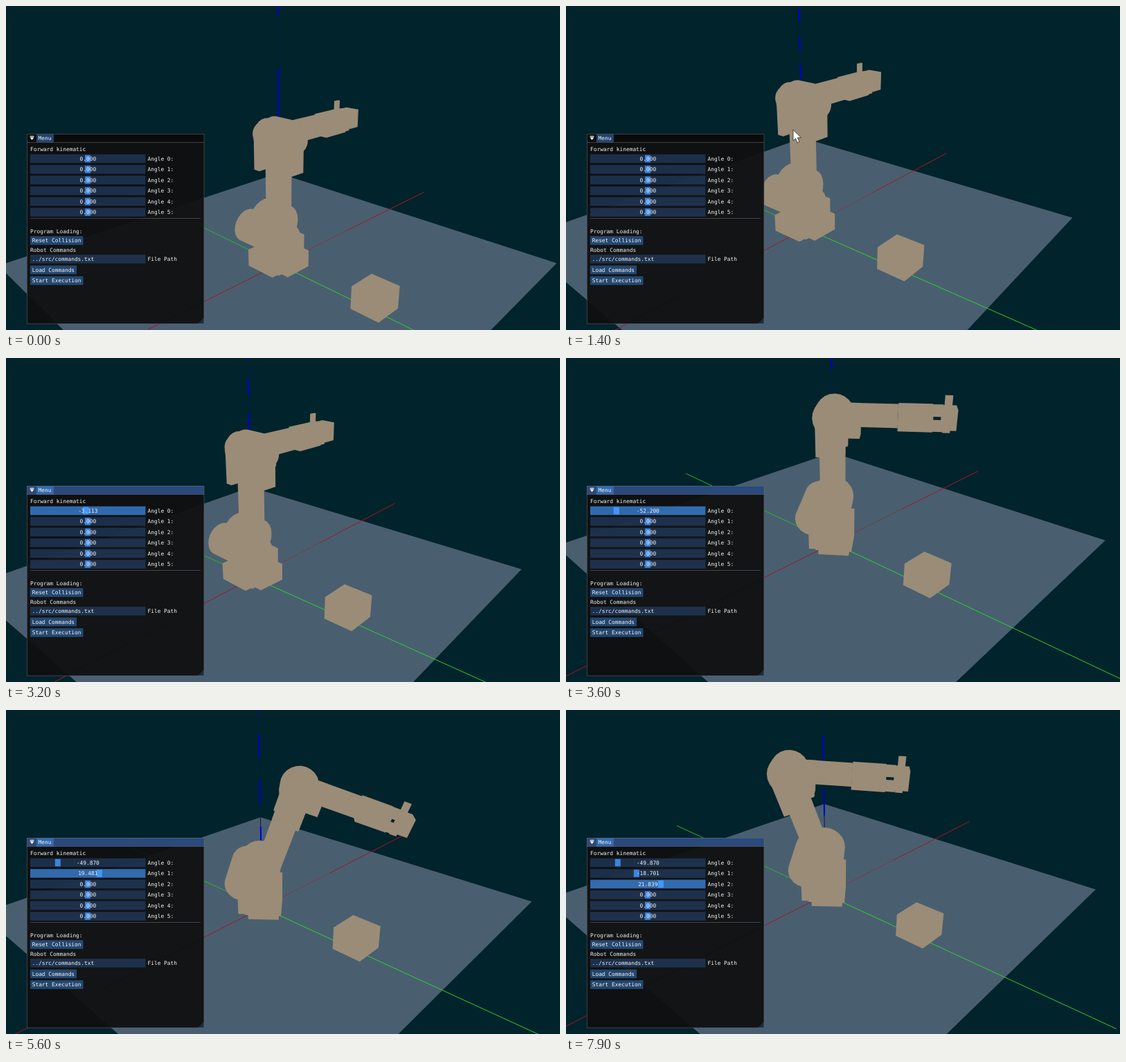
Recreate the animation shown at these times as an HTML page with a canvas. Size 800 by 469 pixels, loop 8 s.

```html
<!DOCTYPE html>
<html lang="en">
<head>
<meta charset="utf-8">
<title>Robot arm viewer</title>
<style>
html, body { margin: 0; width: 100%; height: 100%; overflow: hidden; background: #01232b; }
canvas { display: block; width: 800px; height: 469px; }
</style>
</head>
<body>
<canvas id="stage" width="800" height="469"></canvas>
<script>
const ctx = document.getElementById('stage').getContext('2d');
const W = 800, H = 469, LOOP = 8000, STEP = 100;
const BG = '#01232b', FLOOR = '#495f70', CLAY = '#9b8c77';
const rad = deg => deg * Math.PI / 180;

// Piecewise linear track of [time, ...values]
function sample(keys, t) {
  const i = Math.max(0, keys.findLastIndex(k => k[0] <= t));
  const a = keys[i], b = keys[i + 1] || a;
  const u = a === b ? 0 : (t - a[0]) / (b[0] - a[0]);
  return a.slice(1).map((v, n) => v + (b[n + 1] - v) * u);
}

// Where the world origin appears on the stage while the fixed camera looks around
const aim = [
  [0, 394, 374], [1400, 346, 322], [1800, 346, 322], [2800, 328, 368], [3600, 386, 268],
  [4500, 386, 268], [5600, 370, 286], [6700, 389, 249], [7900, 375, 267]
];

// Joint angles in degrees
const joints = [
  [[0, 0], [2100, 0], [2800, 45.974], [3600, -52.2], [4200, -49.87]],
  [[0, 0], [4800, 0], [5600, 19.481], [6400, -18.701]],
  [[0, 0], [7000, 0], [7900, 21.839]]
];
const drags = [[2000, 4400], [4700, 6500], [6900, 8000]];
const cursors = [
  [[1200, 350, 165], [1400, 328, 179], [1600, 300, 186], [2000, 118, 221]],
  [[4400, 74, 221], [4700, 118, 236]],
  [[6500, 102, 236], [6700, 118, 244], [6900, 118, 252]]
];

// Camera: focal length in pixels, distance from the origin along the diagonal, height
const FOCAL = 750, BACK = 234, HEIGHT = 130;
const SLOPE = HEIGHT / Math.hypot(BACK, HEIGHT);

// Projection that puts the origin on the given pixel
function makeCamera(t) {
  const [px, py] = sample(aim, t), u = px - W / 2, v = py - H / 2;
  const pitch = Math.asin(SLOPE * Math.hypot(FOCAL, u, v) / Math.hypot(FOCAL, v)) - Math.atan2(v, FOCAL);
  const c = Math.cos(pitch), s = Math.sin(pitch);
  const yaw = -Math.atan2(u, FOCAL * c - v * s), cy = Math.cos(yaw), sy = Math.sin(yaw);
  return ([x, y, z]) => {
    const f = BACK + (x + y) * Math.SQRT1_2, r = (x - y) * Math.SQRT1_2, down = HEIGHT - z;
    const ahead = f * cy + r * sy, side = r * cy - f * sy, k = FOCAL / (ahead * c + down * s);
    return [W / 2 + side * k, H / 2 + (down * c - ahead * s) * k];
  };
}

// Solids as corner lists; the arm reaches along x, its joints turn around y
function box(x0, x1, y0, y1, z0, z1) {
  const out = [];
  for (const x of [x0, x1]) for (const y of [y0, y1]) for (const z of [z0, z1]) out.push([x, y, z]);
  return out;
}
function cylinder(axis, a, b, r, from, to) {
  const out = [];
  for (let i = 0; i < 24; i++) {
    const p = a + r * Math.cos(rad(i * 15)), q = b + r * Math.sin(rad(i * 15));
    for (const d of [from, to]) out.push(axis === 'y' ? [p, d, q] : [p, q, d]);
  }
  return out;
}

const AXIS = 142, HALF = 100, SHOULDER = [0, 14], ELBOW = [.7, 66.6];
const cube = box(-5.9, 8.8, -64.5, -49.9, 0, 11.2);
const base = [
  box(-11.5, 9, -7, 10, 0, 9),
  box(-6, 9, -12, 10, 0, 9),
  box(-8, 10, -8, 9, 0, 16),
  cylinder('y', -1, 23, 10.5, -4, 9),
  cylinder('y', -8, 20, 8.5, -14, 14)
];
const arm = [
  cylinder('z', 0, 0, 6.2, 18, 52.5),
  box(-6.5, 6.5, -10, -4, 50, 66),
  box(-6.5, 6.5, 6.5, 10, 50, 66)
];
const fore = [
  cylinder('y', ...ELBOW, 9.2, -5, 5),
  cylinder('y', ...ELBOW, 7.5, -10, 10),
  cylinder('y', ...ELBOW, 4.7, -13.5, 13.5),
  box(5, 13, -4, 4, 57.5, 72),
  box(5, 30, -4, 4, 63, 72),
  box(30, 45.5, -4, 4, 61.5, 72.5),
  // fork, hand and tool
  box(45, 50, -3, 3, 68.4, 72.5),
  box(45, 50, -3, 3, 61.5, 65.3),
  box(49.5, 56, -4, 4, 62.5, 72),
  box(51, 54.5, 4, 8, 64, 70),
  box(51, 54.5, 7.5, 8.5, 58, 75.5),
  box(52, 53, 8, 13, 66, 66.8),
  box(52, 53, 8, 13, 63, 63.8)
];

// Outline of a set of points
function hull(points) {
  const sorted = [...points].sort((a, b) => a[0] - b[0] || a[1] - b[1]);
  const chain = list => {
    const out = [];
    for (const p of list) {
      while (out.length > 1) {
        const a = out[out.length - 2], b = out[out.length - 1];
        if ((b[0] - a[0]) * (p[1] - a[1]) > (b[1] - a[1]) * (p[0] - a[0])) break;
        out.pop();
      }
      out.push(p);
    }
    return out.slice(0, -1);
  };
  return [...chain(sorted), ...chain(sorted.reverse())];
}

function bend([x, y, z], [cx, cz], deg) {
  const c = Math.cos(rad(deg)), s = Math.sin(rad(deg)), dx = x - cx, dz = z - cz;
  return [cx + dx * c + dz * s, y, cz + dz * c - dx * s];
}

function fillPoly(points, color) {
  ctx.beginPath();
  points.forEach(p => ctx.lineTo(p[0], p[1]));
  ctx.closePath();
  ctx.fillStyle = color;
  ctx.fill();
}

function line(a, b, color, width = 1) {
  ctx.beginPath();
  ctx.moveTo(a[0], a[1]);
  ctx.lineTo(b[0], b[1]);
  ctx.strokeStyle = color;
  ctx.lineWidth = width;
  ctx.stroke();
}

function drawScene(project) {
  const ray = (a, b, ...style) => line(project(a), project(b), ...style);
  ctx.fillStyle = BG;
  ctx.fillRect(0, 0, W, H);
  fillPoly([[1, 1], [1, -1], [-1, -1], [-1, 1]].map(([x, y]) => project([x * HALF, y * HALF, 0])), FLOOR);

  const o = [0, 0, 0];
  ray([-AXIS, 0, 0], [AXIS, 0, 0], '#a3142b');
  ray(o, [AXIS * .4, 0, 0], '#5b5660');
  ray([0, AXIS, 0], o, '#27b82e');
  ray(o, [0, -AXIS, 0], '#2bd32b');

  // The upright axis breaks into dashes where it steps across pixel columns
  const foot = project(o), head = project([0, 0, AXIS]);
  const lean = Math.abs((foot[0] - head[0]) / (foot[1] - head[1]));
  const dash = Math.min(75, .65 / Math.max(lean, .001));
  line(head, foot, '#061a4c');
  ctx.setLineDash([dash, dash]);
  line(head, foot, '#0000d8', 2);
  ctx.setLineDash([]);

  fillPoly(hull(cube.map(project)), CLAY);
}

function drawRobot(project, [yaw, lift, fold]) {
  const c = Math.cos(rad(yaw)), s = Math.sin(rad(yaw));
  const spin = ([x, y, z]) => [x * c - y * s, x * s + y * c, z];
  const raise = p => bend(p, SHOULDER, lift);
  const draw = (solids, pose) => solids.forEach(solid =>
    fillPoly(hull(solid.map(p => project(spin(pose(p))))), CLAY));
  draw(base, p => p);
  draw(arm, raise);
  draw(fore, p => raise(bend(p, ELBOW, fold)));
}

function rect(x, y, w, h, color) {
  ctx.fillStyle = color;
  ctx.fillRect(x, y, w, h);
}

function text(str, x, y, align = 'left') {
  ctx.textAlign = align;
  ctx.fillStyle = '#f4f4f4';
  ctx.fillText(str, x, y + .5);
}

function button(label, y, w) {
  rect(35, y - 6.3, w, 12.6, 'rgba(66,150,250,.4)');
  text(label, 37.7, y);
}

function drawMenu(t, angles) {
  const focused = t >= drags[0][0], edge = 'rgba(110,110,128,.5)', field = 'rgba(41,74,122,.54)';
  ctx.font = '7.85px "DejaVu Sans Mono", "Liberation Mono", monospace';
  ctx.textBaseline = 'middle';
  rect(30, 185, 256, 275, 'rgba(15,15,15,.94)');
  rect(30, 185, 256, 12.5, focused ? '#294a7a' : '#0a0a0a');
  rect(44, 185.5, 25, 12, focused ? '#3369ad' : '#24436c');
  ctx.strokeStyle = edge;
  ctx.lineWidth = 1;
  ctx.strokeRect(30.5, 185.5, 255.5, 274.5);
  line([30, 197.5], [286, 197.5], edge);
  rect(34.5, 188, 6, 1.2, '#fff');
  fillPoly([[34.5, 190], [40.5, 190], [37.5, 194]], '#fff');
  text('Menu', 46.5, 191);

  text('Forward kinematic', 35, 207.5);
  for (let i = 0; i < 6; i++) {
    const y = 221 + i * 15.5, v = angles[i] || 0;
    const held = i < 3 && t >= drags[i][0] && t < drags[i][1];
    rect(35, y - 6.3, 166.5, 12.6, held ? 'rgba(66,150,250,.67)' : field);
    rect(114 + v * .866, y - 5.3, 8, 10.6, held ? '#4296fa' : '#3d85e0');
    text(v.toFixed(3), 118.3, y, 'center');
    text('Angle ' + i + ':', 204.5, y);
  }
  line([35, 307.5], [281, 307.5], edge);

  text('Program Loading:', 35, 326);
  button('Reset Collision', 339.5, 76.5);
  text('Robot Commands', 35, 353);
  rect(35, 360, 166.5, 12.6, field);
  text('../src/commands.txt', 37.5, 366.3);
  text('File Path', 204.5, 366.3);
  button('Load Commands', 382, 67);
  button('Start Execution', 397.5, 76.5);
  fillPoly([[286, 451], [286, 460], [277, 460]], 'rgba(66,150,250,.2)');
}

function drawCursor(t) {
  const path = cursors.find(c => t >= c[0][0] && t < c[c.length - 1][0]);
  if (!path) return;
  const [x, y] = sample(path, t);
  const arrow = [[0, 0], [0, 16], [3.5, 12.8], [6.2, 18.8], [9, 17.5], [6.4, 11.8], [11.3, 11.6]];
  fillPoly(arrow.map(p => [x + p[0], y + p[1]]), '#fff');
  ctx.strokeStyle = '#222';
  ctx.lineWidth = .8;
  ctx.stroke();
}

function draw(t) {
  const project = makeCamera(t), angles = joints.map(keys => sample(keys, t)[0]);
  drawScene(project);
  drawRobot(project, angles);
  drawMenu(t, angles);
  drawCursor(t);
}

const start = performance.now();
function tick() {
  const t = (performance.now() - start) % LOOP;
  draw(Math.floor(t / STEP) * STEP);
  requestAnimationFrame(tick);
}
tick();
</script>
</body>
</html>
```
